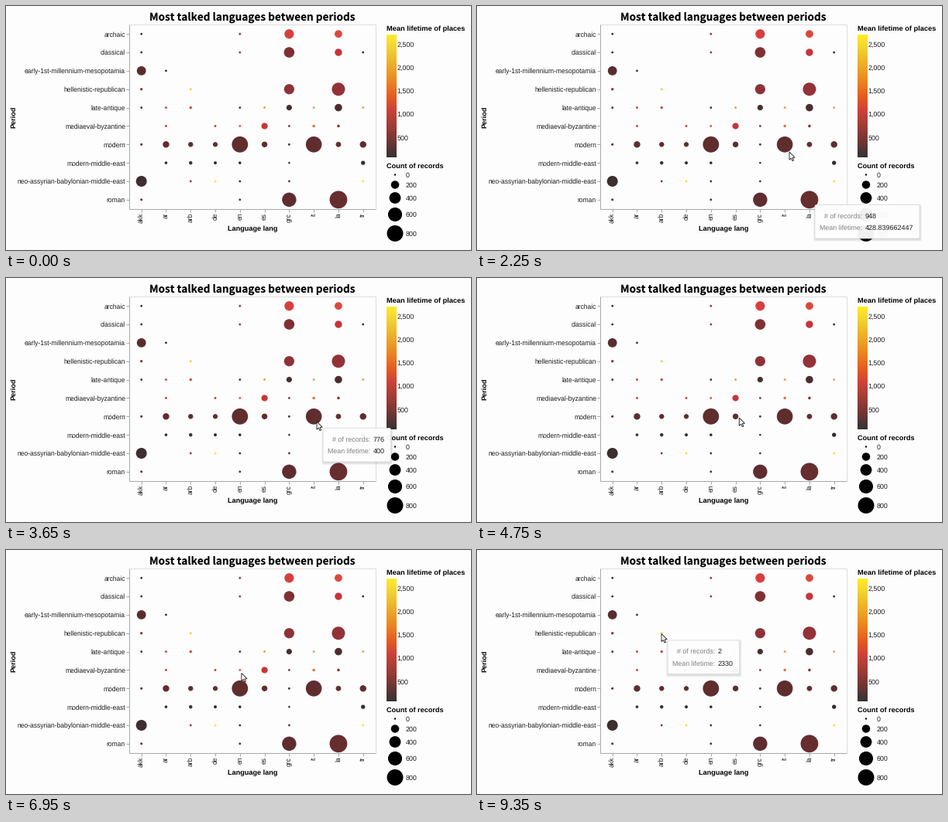
Recreate the animation shown at these times as a matplotlib script. Size 600 by 316 pixels, loop 9400 ms.

```python
import matplotlib.pyplot as plt
import numpy as np
from matplotlib.animation import FuncAnimation
from matplotlib.colors import LinearSegmentedColormap, to_rgba
from matplotlib.patches import Circle, FancyBboxPatch, Polygon

plt.rcParams["text.hinting"] = "none"

W, H, DPI = 600, 316, 100
STEP = 50
FRAMES = 188
SANS = "Liberation Sans"
INK = "#1c1c1c"

LANGS = ["akk", "ar", "arb", "de", "en", "es", "grc", "it", "la", "tr"]
# period -> language -> (radius, mean lifetime)
DOTS = {
    "archaic": dict(akk=(1.4, 200), en=(1.4, 600), grc=(6.1, 1050), la=(4.9, 1130)),
    "classical": dict(akk=(1.4, 200), en=(1.4, 650), grc=(6.8, 530), la=(4.7, 900),
                      tr=(1.4, 150)),
    "early-1st-millennium-mesopotamia": dict(akk=(5.9, 350), ar=(1.4, 200)),
    "hellenistic-republican": dict(akk=(1.6, 500), arb=(1.5, 2330), grc=(6.6, 600),
                                   la=(8.5, 620)),
    "late-antique": dict(akk=(1.4, 200), ar=(1.4, 900), arb=(1.7, 1100), en=(1.4, 200),
                         es=(1.4, 1700), grc=(3.6, 250), it=(1.4, 1700),
                         la=(4.8, 250), tr=(1.4, 1700)),
    "mediaeval-byzantine": dict(ar=(1.4, 800), de=(1.4, 850), en=(1.5, 1350),
                                es=(4.1, 920), grc=(1.4, 550), it=(1.7, 1400),
                                la=(1.8, 600)),
    "modern": dict(akk=(1.5, 350), ar=(4.2, 400), arb=(3.2, 400), de=(3.1, 400),
                   en=(10.4, 400), es=(3.7, 400), grc=(1.4, 250), it=(10.3, 400),
                   la=(3.4, 430), tr=(4.2, 400)),
    "modern-middle-east": dict(ar=(1.8, 100), arb=(2.2, 100), de=(2.0, 100),
                               en=(1.8, 100), grc=(1.3, 200), tr=(2.7, 120)),
    "neo-assyrian-babylonian-middle-east": dict(akk=(7.0, 130), arb=(1.4, 650),
                                                de=(1.5, 2600), en=(1.4, 250),
                                                grc=(1.4, 500), tr=(1.4, 2500)),
    "roman": dict(akk=(1.5, 350), en=(1.4, 250), grc=(9.2, 400), la=(11.4, 429)),
}

LOW, HIGH = 68, 2707
CMAP = LinearSegmentedColormap.from_list("heat", [
    "#343434", "#703633", "#9e3c38", "#cc4037", "#e75d1e",
    "#ec8620", "#eeab29", "#f0ce32", "#ffeb2c"])
DOT_CMAP = LinearSegmentedColormap.from_list("dots", [
    (0, "#322f30"), (0.126, "#602d2e"), (0.2, "#8f3237"), (0.34, "#d2363c"),
    (0.48, "#e6603a"), (0.62, "#e89a40"), (0.85, "#f3cf4a"), (1, "#ffeb4c")])

LEFT, RIGHT, TOP, BOTTOM = 158.5, 476.5, 23.5, 262.5
col_x = {lang: 174.7 + 31.78 * i for i, lang in enumerate(LANGS)}
row_y = {period: 36.2 + 23.85 * i for i, period in enumerate(DOTS)}

fig = plt.figure(figsize=(W / DPI, H / DPI), dpi=DPI, facecolor="#fdfdfd")
ax = fig.add_axes([0, 0, 1, 1])
ax.axis("off")


def pt(px):
    return px * 72 / DPI


def text(x, y, s, px, ha="left", color=INK, bold=False, font=SANS, **kw):
    return ax.text(x, y, s, fontsize=pt(px), family=font, ha=ha, color=color,
                   va=kw.pop("va", "center_baseline"),
                   weight="bold" if bold else "normal", **kw)


def line(x0, y0, x1, y1, color="#a8a8a8"):
    ax.plot([x0, x1], [y0, y1], color=color, lw=pt(1), zorder=1,
            solid_capstyle="butt")


def draw_axes():
    text(317.5, 13, "Most talked languages between periods", 13.6, "center",
         "black", True, "Noto Sans CJK JP")
    line(LEFT, TOP, RIGHT, TOP, "#dddddd")
    line(RIGHT, TOP, RIGHT, BOTTOM, "#dddddd")
    line(LEFT, TOP, LEFT, BOTTOM)
    line(LEFT, BOTTOM, RIGHT, BOTTOM)
    for period, y in row_y.items():
        line(154.5, y, LEFT, y)
        text(154, y, period, 8.57, "right")
    for lang, x in col_x.items():
        line(x, BOTTOM, x, 267)
        text(x, 267.8, lang, 8.57, "center", va="top", rotation=90)
    text(318, 288, "Language lang", 9.1, "center", "black", True)
    text(9.5, 144, "Period", 9.1, "center", "black", True, va="center", rotation=90)


def draw_dots():
    for period, row in DOTS.items():
        for lang, (r, mean) in row.items():
            shade = DOT_CMAP((mean - LOW) / (HIGH - LOW))
            ax.add_patch(Circle((col_x[lang], row_y[period]), r, color=shade,
                                lw=0, zorder=3))


def draw_legends():
    text(490.7, 29, "Mean lifetime of places", 9.25, color="black", bold=True)
    ax.imshow(np.linspace(1, 0, 256)[:, None], cmap=CMAP, aspect="auto",
              extent=(491, 504, 196, 37), zorder=2)
    for v in range(500, 2501, 500):
        text(504.7, 170.2 - (v - 500) * 0.0603, f"{v:,}", 8.9)
    text(490.7, 207, "Count of records", 9.15, color="black", bold=True)
    for n, y in zip(range(0, 801, 200), (218.5, 231.5, 248.5, 270, 294.5)):
        ax.add_patch(Circle((502, y), max(1.2, 0.37 * n ** 0.5), color="black",
                            lw=0, zorder=2))
        text(515.3, y, str(n), 8.9)


class Tooltip:
    SIZE = 9

    def __init__(self):
        self.shadows = [self.box("black", 0.045, "none", 10) for _ in range(3)]
        self.panel = self.box("white", 0.95, "#dcdcdc", 11)
        self.labels = [text(0, 0, s, 8.9, "right", "#808080", zorder=12)
                       for s in ("# of records:", "Mean lifetime:")]
        self.values = [text(0, 0, "", self.SIZE, zorder=12) for _ in range(2)]
        self.parts = self.shadows + [self.panel] + self.labels + self.values

    @staticmethod
    def box(face, alpha, edge, z):
        style = "round,pad=0,rounding_size=2"
        return ax.add_patch(FancyBboxPatch(
            (0, 0), 1, 1, boxstyle=style, lw=pt(0.8), zorder=z,
            facecolor=to_rgba(face, alpha), edgecolor=edge))

    def show(self, state):
        for part in self.parts:
            part.set_visible(state is not None)
        if state is None:
            return
        x, y, *rows = state
        wide = 72.5 + max(sum(0.278 if c == "." else 0.556 for c in s)
                          for s in rows) * self.SIZE
        self.panel.set_bounds(x, y, wide, 43.5)
        for grow, shadow in enumerate(self.shadows):
            shadow.set_bounds(x - grow, y + 1 - grow, wide + 2 * grow + 1,
                              44.5 + 2 * grow)
        for i, row in enumerate(rows):
            base = y + 14 + 15.3 * i
            self.labels[i].set_position((x + 61, base))
            self.values[i].set_position((x + 65, base))
            self.values[i].set_text(row)


ARROW = np.array([(0, 0), (0, 10.2), (2.4, 8), (4, 11.6), (5.6, 10.9),
                  (4.1, 7.4), (7.2, 7.2)])

# time, x, y of the pointer tip
PATH = [(300, 430, 251), (1950, 430, 251), (2050, 428, 249), (2200, 403, 189),
        (2450, 403, 189), (2600, 401, 186), (4350, 401, 186), (4850, 331, 180.5),
        (6700, 331, 180.5), (7400, 238, 108.5), (9400, 238, 108.5)]

# start, end, x, y, records, mean lifetime
TIPS = [(300, 2050, 438, 259.5, "948", "428.839662447"),
        (2050, 2350, 436, 257.5, "948", "428.839662447"),
        (2600, 4400, 409, 194.5, "776", "400"),
        (4900, 6750, 338.5, 188.5, "96", "400"),
        (8250, 9400, 246, 117, "2", "2330")]


def pointer(t):
    for (t0, *a), (t1, *b) in zip(PATH, PATH[1:]):
        if t0 <= t < t1:
            u = (t - t0) / (t1 - t0)
            u = u * u * (3 - 2 * u)
            return np.array(a) + u * (np.array(b) - np.array(a))
    return None


draw_axes()
draw_dots()
draw_legends()
ax.set_xlim(0, W)
ax.set_ylim(H, 0)
tip = Tooltip()
arrow = ax.add_patch(Polygon(ARROW, closed=True, facecolor="white",
                             edgecolor="#222222", lw=pt(0.9), zorder=20))


def update(frame):
    t = frame * STEP
    pos = pointer(t)
    arrow.set_visible(pos is not None)
    if pos is not None:
        arrow.set_xy(ARROW + pos)
    tip.show(next((s[2:] for s in TIPS if s[0] <= t < s[1]), None))
    return [arrow, *tip.parts]


anim = FuncAnimation(fig, update, frames=FRAMES, interval=STEP, repeat=True,
                     repeat_delay=0, init_func=lambda: update(0), blit=False)
plt.show()
```
